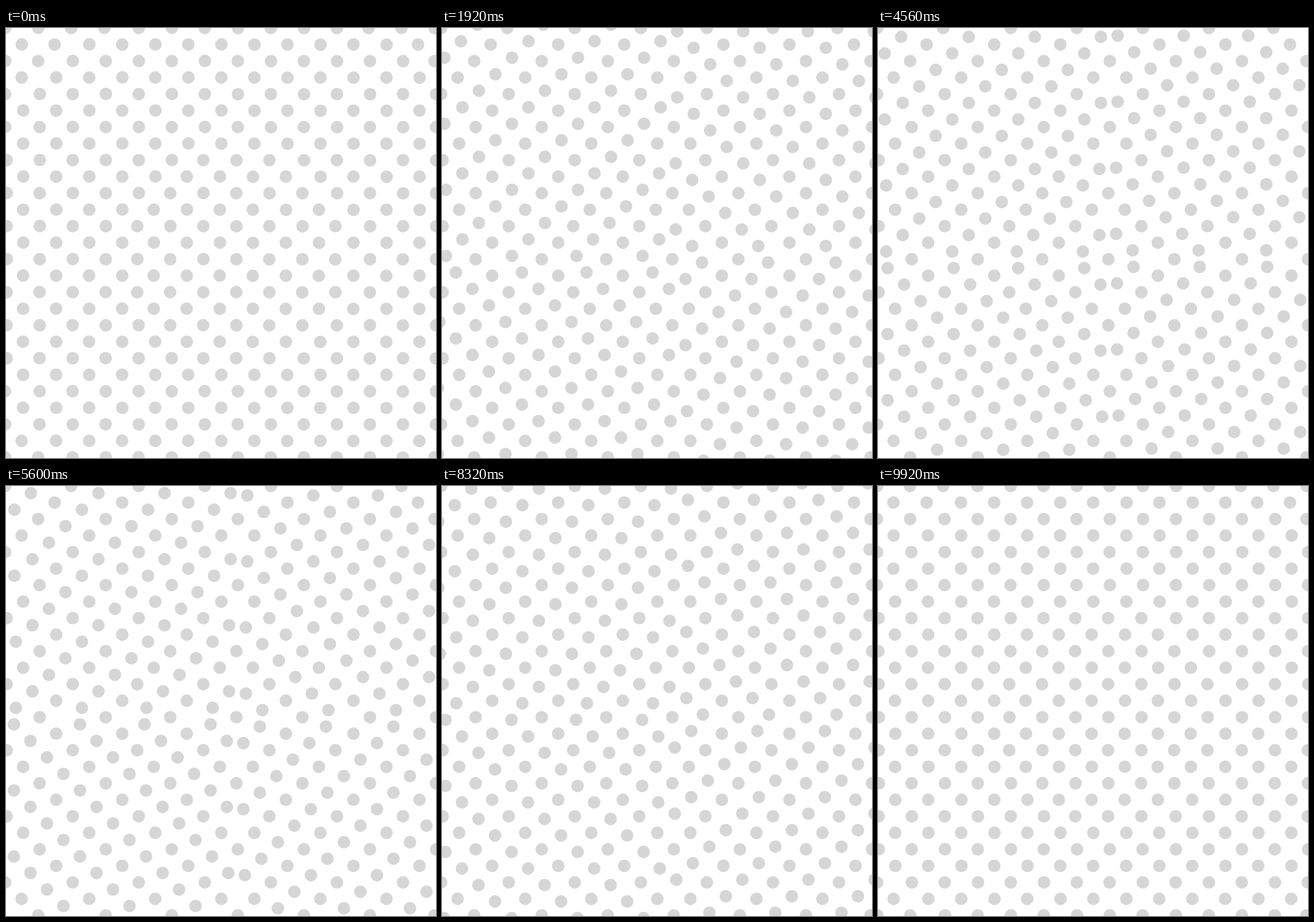
Recreate the animation shown at these times as an HTML page with a canvas. Size 740 by 740 pixels, loop 10 s.

```html
<!DOCTYPE html>
<html>
<head>
<meta charset="utf-8">
<style>
  html, body { margin: 0; height: 100%; overflow: hidden; background: #fff; }
  canvas { display: block; }
</style>
</head>
<body>
<canvas id="stage" width="740" height="740"></canvas>
<script>
const ctx = document.getElementById('stage').getContext('2d');
const PITCH = 28.42, RADIUS = 10.7, MID = 14;
const LOOP = 10000, STEP = 80;

// Direction of travel: clockwise along the diagonals of each quadrant.
function heading(col, row) {
  if (col < MID && row <= MID) return [1, -1];
  if (col >= MID && row < MID) return [1, 1];
  if (col > MID && row >= MID) return [-1, 1];
  if (col <= MID && row > MID) return [-1, -1];
  return [0, 0];
}

// The lattice is nudged sideways in concentric rings around the centre.
function nudge(col, row) {
  const d2 = (col - MID) ** 2 + (row - MID) ** 2;
  return d2 > 45 && d2 < 255 ? 1.1 : -1.5;
}

const dots = [];
for (let row = -1; row <= 27; row++) {
  for (let col = -1; col <= 27; col++) {
    if ((row + col) % 2) continue;
    const [hx, hy] = heading(col, row);
    // Every second diagonal lying along the heading moves.
    const diagonal = hx === hy ? col - row : col + row;
    const moves = Math.abs(diagonal) % 4 === 2;
    const reach = PITCH + (col < MID ? -0.4 : 0.4);
    dots.push({
      x: col * PITCH + nudge(col, row),
      y: row * PITCH,
      dx: moves ? hx * reach : 0,
      dy: moves ? hy * PITCH : 0
    });
  }
}

function draw(time) {
  const progress = (Math.floor(time % LOOP / STEP) + 1) * STEP / LOOP;
  ctx.fillStyle = '#fff';
  ctx.fillRect(0, 0, 740, 740);
  ctx.fillStyle = '#d6d6d6';
  for (const { x, y, dx, dy } of dots) {
    ctx.beginPath();
    ctx.arc(x + dx * progress, y + dy * progress, RADIUS, 0, 2 * Math.PI);
    ctx.fill();
  }
}

let start;
function tick(now) {
  start ??= now;
  draw(now - start);
  requestAnimationFrame(tick);
}
draw(0);
requestAnimationFrame(tick);
</script>
</body>
</html>
```
